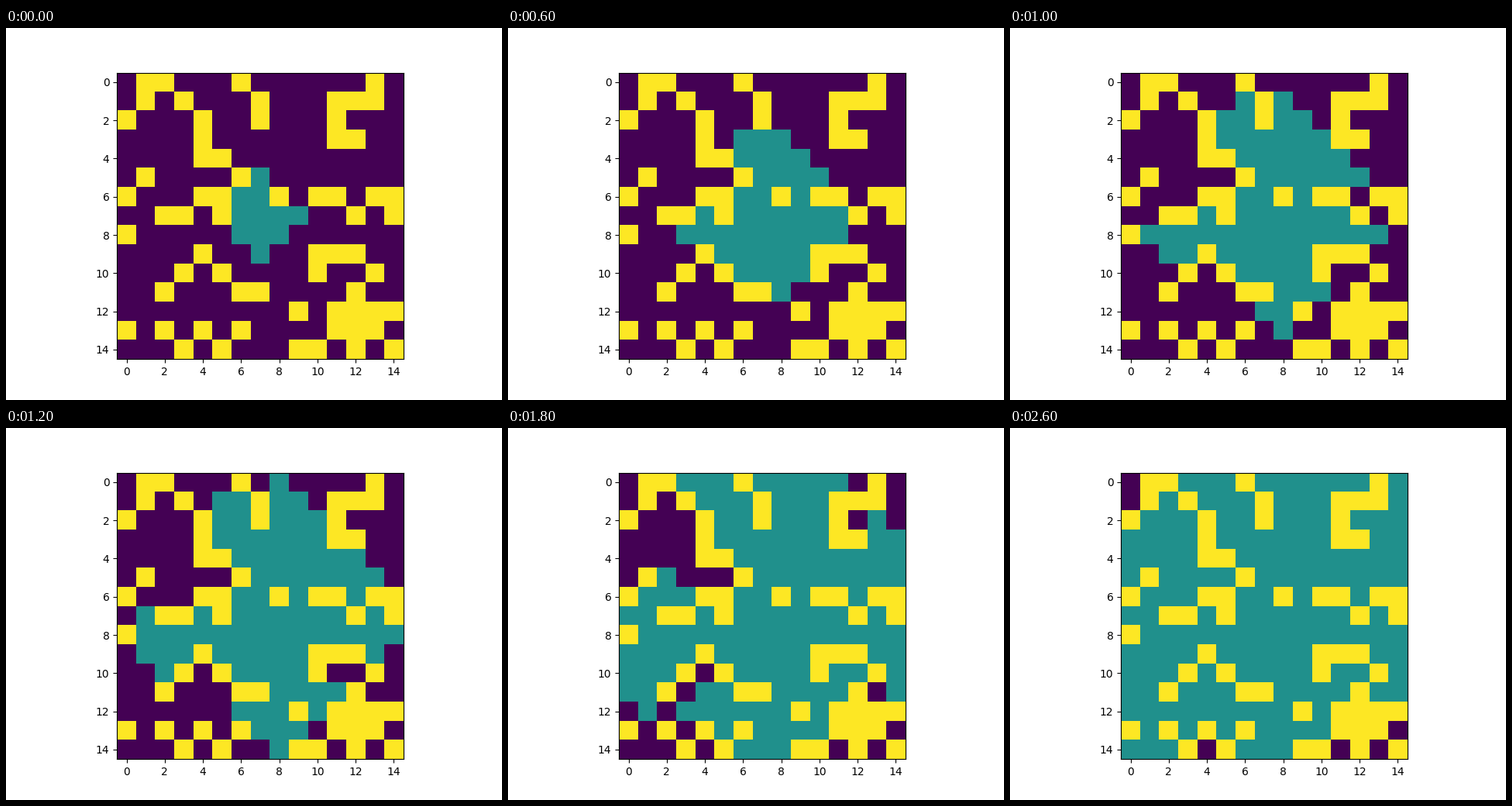
A matplotlib script that plays this animation: 640x480 px, repeating every 8000 ms.

```python
import numpy as np
import matplotlib.pyplot as plt
from matplotlib.animation import FuncAnimation

SIZE = 15
START = (7, 7)
FIRST_REACH = 2
FRAMES, STEP_MS = 40, 200
EMPTY, FILLED, WALL = 0, 1, 2


def make_maze():
    maze = np.full((SIZE, SIZE), EMPTY)

    # Two chevrons and a zigzag
    for k in range(-2, 3):
        maze[abs(k), 2 + k] = WALL
        maze[9 + abs(k), 4 + k] = WALL
        maze[13 + k % 2, 4 + k] = WALL

    # Upper left: spaced blocks, a bar and an L
    maze[:6:5, 1:7:5] = WALL
    maze[1:3, 7] = WALL
    maze[2:5, 4] = WALL
    maze[4, 4:6] = WALL

    # Upper right: bracket with a spur
    maze[:2, 13] = WALL
    maze[1:4, 11] = WALL
    maze[1:4:2, 12] = WALL

    # Middle band
    maze[8::5, 0] = WALL
    maze[6, :9:4] = WALL
    maze[6:8, 5] = WALL
    maze[7, 2:4] = WALL
    maze[6, 10::4] = WALL
    maze[6, 11::2] = WALL
    maze[7, 12::2] = WALL

    # Lower right: bar, spaced blocks and a solid patch
    maze[9, 10:13] = WALL
    maze[10, 10::3] = WALL
    maze[11, 2::5] = WALL
    maze[12:14, 11:14] = WALL
    maze[12, 11:] = WALL
    maze[14, 10::2] = WALL
    maze[12::2, 9] = WALL
    return maze


def flood_distances(maze, start):
    """Breadth-first step count from start; unreachable cells stay at inf."""
    dist = np.full(maze.shape, np.inf)
    dist[start] = 0
    queue = [start]
    for r, c in queue:
        for cell in ((r - 1, c), (r + 1, c), (r, c - 1), (r, c + 1)):
            inside = 0 <= cell[0] < SIZE and 0 <= cell[1] < SIZE
            if inside and maze[cell] == EMPTY and np.isinf(dist[cell]):
                dist[cell] = dist[r, c] + 1
                queue.append(cell)
    return dist


maze = make_maze()
dist = flood_distances(maze, START)


def state(i):
    return np.where(dist <= i + FIRST_REACH, FILLED, maze)


fig, ax = plt.subplots(figsize=(6.4, 4.8), dpi=100)
image = ax.imshow(state(0), cmap="viridis", vmin=EMPTY, vmax=WALL)


def update(i):
    image.set_data(state(i))
    return (image,)


anim = FuncAnimation(fig, update, frames=FRAMES, interval=STEP_MS, repeat=True)
plt.show()
```
